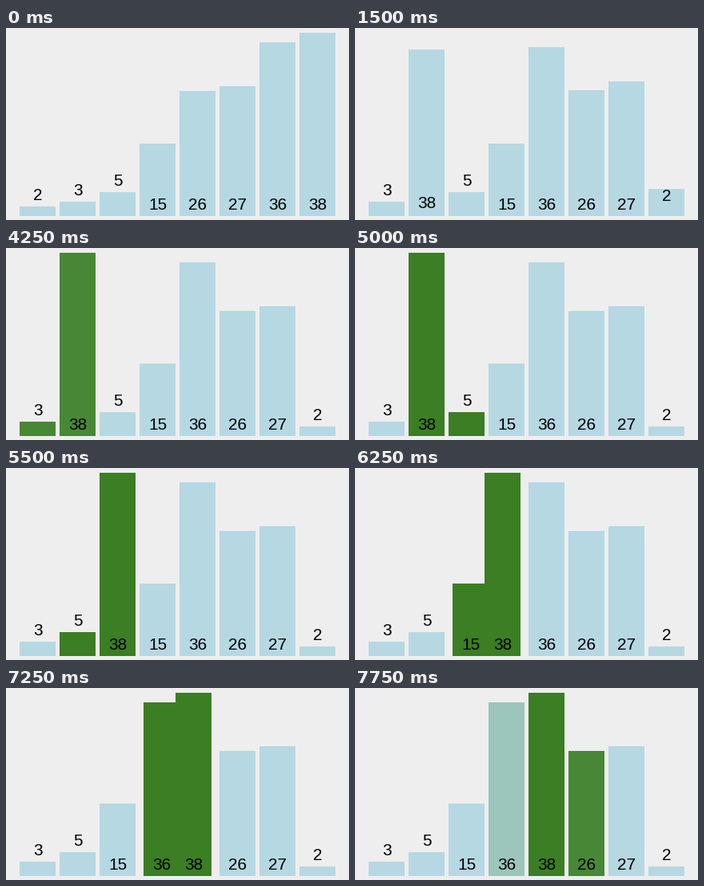
Animation of 429x241 px, one loop 8 s. Source, as a matplotlib script:

```python
import numpy as np
import matplotlib.pyplot as plt
from matplotlib.animation import FuncAnimation
from matplotlib.patches import Rectangle

W, H, DPI = 429, 241, 64
FRAMES, STEP_MS = 32, 250
BASE, LEFT, PITCH, BAR_W = 236, 17, 50, 45
UNIT = 230 / 38
BLUE = np.array([182, 216, 227]) / 255
GREEN = np.array([59, 126, 35]) / 255

START = [2, 3, 5, 15, 26, 27, 36, 38]
SHUFFLED = [3, 38, 5, 15, 36, 26, 27, 2]
MOVE, FADE_IN, FADE_OUT = 0.9, 0.9, 0.79   # progress seen on the first tick


def label_y(value):
    """Baseline: inside tall bars, above short ones."""
    return BASE - 8 if value >= 10 else BASE - value * UNIT - 8


def snapshot(values, slots, lit=()):
    return {
        "values": list(values),
        "x": np.array([LEFT + PITCH * s for s in slots], float),
        "h": np.array(values) * UNIT,
        "ty": np.array([label_y(v) for v in values]),
        "lit": np.array([float(s in lit) for s in slots]),
    }


def build_steps():
    """List of (first tick, state) for the shuffle and the bubble sort pass."""
    slots = list(range(8))
    steps = [(0, snapshot(START, slots)), (6, snapshot(SHUFFLED, slots))]
    tick, i = 17, 0
    while tick < FRAMES:
        pair = (i, i + 1)
        steps.append((tick, snapshot(SHUFFLED, slots, pair)))
        tick += 2
        a, b = slots.index(i), slots.index(i + 1)
        if SHUFFLED[a] > SHUFFLED[b]:
            slots[a], slots[b] = slots[b], slots[a]
            steps.append((tick, snapshot(SHUFFLED, slots, pair)))
            tick += 2
        i += 1
    return steps


STEPS = build_steps()


def state_at(tick):
    n = max(k for k, (first, _) in enumerate(STEPS) if first <= tick)
    first, goal = STEPS[n]
    if n == 0 or tick > first:
        return goal
    prev = STEPS[n - 1][1]
    mixed = {"values": goal["values"]}
    for key in ("x", "h", "ty"):
        mixed[key] = prev[key] + MOVE * (goal[key] - prev[key])
    rise = goal["lit"] - prev["lit"]
    mixed["lit"] = prev["lit"] + rise * np.where(rise > 0, FADE_IN, FADE_OUT)
    return mixed


fig = plt.figure(figsize=(W / DPI, H / DPI), dpi=DPI, facecolor="#eeeeee")
ax = fig.add_axes([0, 0, 1, 1])
ax.set_xlim(0, W)
ax.set_ylim(H, 0)
ax.axis("off")

bars = [ax.add_patch(Rectangle((0, 0), BAR_W, 1, lw=0)) for _ in START]
labels = [
    ax.text(0, 0, "", ha="center", va="baseline", color="black",
            family="Liberation Sans", size=20.8 * 72 / DPI, zorder=3)
    for _ in START
]


def draw(tick):
    s = state_at(tick)
    for i, (bar, label) in enumerate(zip(bars, labels)):
        x, h = s["x"][i], round(s["h"][i])
        bar.set_bounds(x, BASE - h, BAR_W, h)
        bar.set_facecolor(BLUE + s["lit"][i] * (GREEN - BLUE))
        label.set_position((x + BAR_W / 2, s["ty"][i]))
        label.set_text(str(s["values"][i]))
    return bars + labels


anim = FuncAnimation(fig, draw, frames=FRAMES, interval=STEP_MS,
                     init_func=lambda: draw(0), repeat=True, repeat_delay=0)
plt.show()
```
